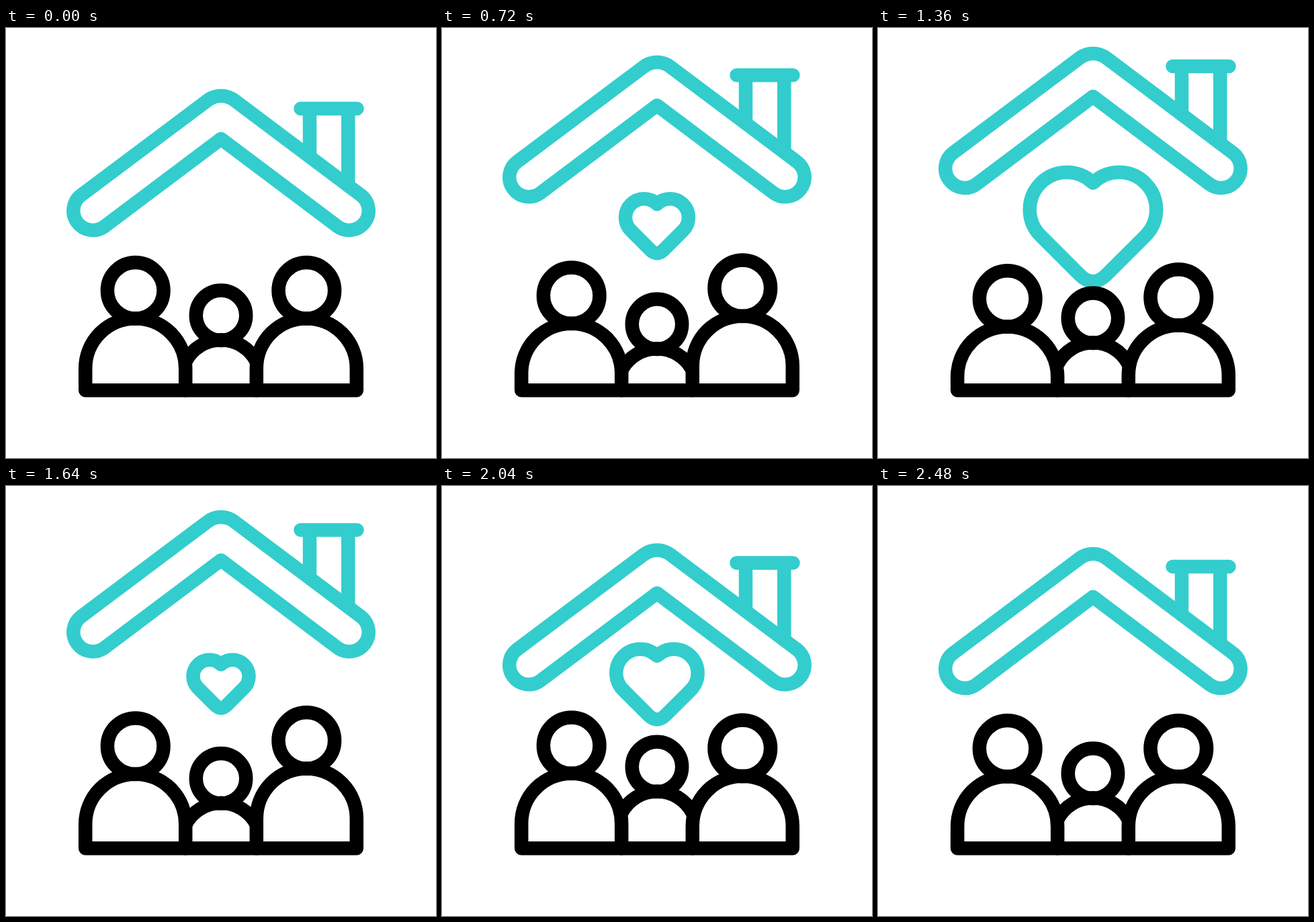
An HTML page for the animation above (2640 ms loop, 640x640 px).

```html
<!DOCTYPE html>
<html lang="en">
<head>
<meta charset="utf-8">
<title>Family home</title>
<style>
  html, body { margin: 0; width: 100%; height: 100%; overflow: hidden; background: #fff; }
  svg { display: block; width: 100%; height: 100%; }
  path, circle { fill: none; stroke-width: 20.5; stroke-linecap: round; stroke-linejoin: round; }
  .teal { stroke: #33cdcd; }
  .black { stroke: #000; }
</style>
</head>
<body>
<svg viewBox="0 0 640 640">
  <g id="roof" class="teal">
    <path d="M320 165L146.7 295.2A29 29 0 0 1 111.9 248.8L300 107.7A33 33 0 0 1 340 107.7L528.1 248.8A29 29 0 0 1 493.3 295.2Z"/>
    <path d="M438.5 120H522.5M452 120V191.7M509.3 120V234.7"/>
  </g>
  <path id="heart" class="teal" vector-effect="non-scaling-stroke"
    d="M0 -40.9A36 36 0 1 0 -50.5 10.5L-13 48Q0 61 13 48L50.5 10.5A36 36 0 1 0 0 -40.9Z"/>
  <g class="black">
    <circle id="leftHead" cx="192.7" cy="390.7" r="41.8"/>
    <path id="leftBody"/>
    <circle id="rightHead" cx="447.3" cy="390.7" r="41.8"/>
    <path id="rightBody"/>
    <g id="child">
      <circle cx="320" cy="427.7" r="37.2"/>
      <path d="M267.2 496.6A59.3 59.3 0 0 1 372.8 496.6"/>
    </g>
    <path d="M267.2 539.3H372.8"/>
  </g>
</svg>
<script>
const LOOP = 2640, STEP = 40, BEAT = 400;
const $ = id => document.getElementById(id);

// Eased value at time t through a list of [time, value] keys
function tween(keys, t) {
  if (t <= keys[0][0]) return keys[0][1];
  for (let i = 1; i < keys.length; i++) {
    const [t0, a] = keys[i - 1], [t1, b] = keys[i];
    if (t < t1) {
      const x = (t - t0) / (t1 - t0);
      return a + (b - a) * x * x * (3 - 2 * x);
    }
  }
  return keys[keys.length - 1][1];
}

const beats = (start, values) => values.map((v, i) => [start + i * BEAT, v]);
const bob = start => beats(start, [0, 13, -12.5, 13, -12.5, 0]);

const right = bob(80), left = bob(200), child = bob(320);
const heart = beats(80, [0, 0.98, 0.65, 1.64, 0.65, 1, 0]);
const roof = [[240, 0], [920, -63], [1484, -63], [2164, 0]];

const shift = (id, dy) => $(id).setAttribute("transform", `translate(0 ${dy})`);

// The shoulders follow the head while the base stays put
function poseAdult(side, x, dy) {
  shift(side + "Head", dy);
  $(side + "Body").setAttribute("d",
    `M${x} 539.3V${506.7 + dy}a74.5 74.5 0 0 1 149 0V539.3Z`);
}

function draw(now) {
  const t = Math.floor(now % LOOP / STEP) * STEP;
  shift("roof", tween(roof, t));
  shift("child", tween(child, t));
  poseAdult("left", 118.2, tween(left, t));
  poseAdult("right", 372.8, tween(right, t));
  const size = tween(heart, t);
  $("heart").style.display = size > 0 ? "" : "none";
  $("heart").setAttribute("transform", `translate(320 293.5) scale(${size})`);
}

const start = performance.now();
function tick() {
  draw(performance.now() - start);
  requestAnimationFrame(tick);
}
tick();
</script>
</body>
</html>
```
